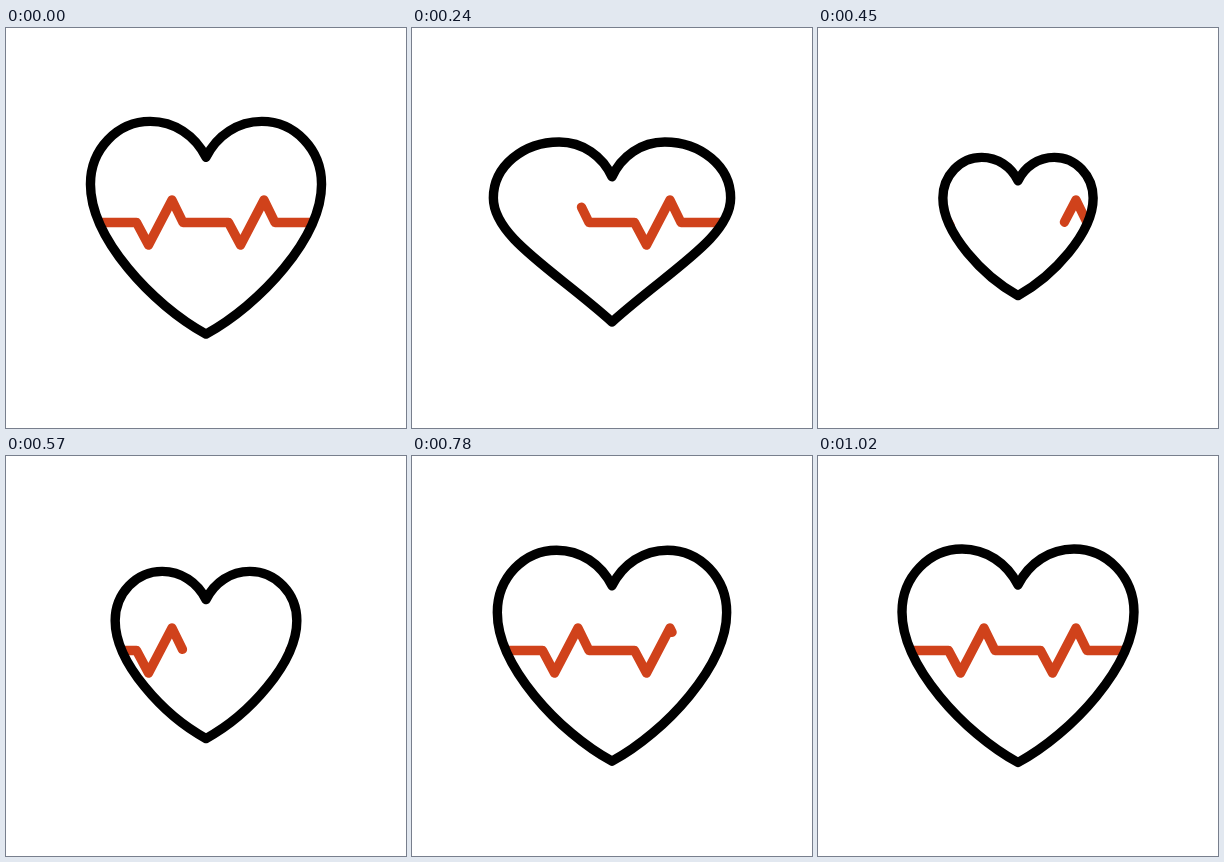
An HTML page for the animation above (1.29 s loop, 400 px wide and 400 px high).

```html
<!DOCTYPE html>
<html lang="en">
<head>
<meta charset="utf-8">
<title>Heartbeat</title>
<style>
  /* Each shape is the stage frame plus a heart, so the even-odd fill masks everything outside the heart. */
  :root {
    --rest: path("M-20 -20H420V420H-20Z M200 129C189 107 168 93 144 93C111 93 84 121 84 156C84 210 146 277 200 306.5C254 277 316 210 316 156C316 121 289 93 256 93C232 93 211 107 200 129Z");
    --small: path("M-20 -20H420V420H-20Z M200 152.7C192.9 138.4 179.3 129.4 163.8 129.4C142.4 129.4 124.9 147.5 124.9 170.1C124.9 205.1 165.1 248.4 200 267.5C234.9 248.4 275.1 205.1 275.1 170.1C275.1 147.5 257.6 129.4 236.2 129.4C220.7 129.4 207.1 138.4 200 152.7Z");
    --wide: path("M-20 -20H420V420H-20Z M200 148C190 126 169 111 144 111C106 111 73 136 73 170C73 210 138 241 200 299C262 241 327 210 327 170C327 136 294 111 256 111C231 111 210 126 200 148Z");
  }
  html, body { margin: 0; width: 100%; height: 100%; overflow: hidden; background: #fff; }
  svg { display: block; width: 100%; height: 100%; stroke-width: 9.4; stroke-linecap: round; stroke-linejoin: round; }

  .heart {
    d: var(--rest);
    fill: #fff;
    fill-rule: evenodd;
    stroke: #000;
    animation: beat 1290ms linear infinite;
  }
  .pulse { fill: none; stroke: #d0421b; stroke-dasharray: 1 2; }
  .leave { animation: leave 1290ms linear infinite; }
  .enter { animation: enter 1290ms linear infinite; }

  @keyframes beat {
    0% { d: var(--rest); }
    6.977% { d: var(--small); }
    20.93% { d: var(--wide); }
    27.907% { d: var(--rest); }
    34.884% { d: var(--small); animation-timing-function: cubic-bezier(.33, .1, .3, 1); }
    67.442%, 100% { d: var(--rest); }
  }
  @keyframes leave {
    0% { stroke-dashoffset: 0; }
    48.837% { stroke-dashoffset: -1; }
    48.838%, 100% { stroke-dashoffset: -1.2; }
  }
  @keyframes enter {
    0%, 30.619% { stroke-dashoffset: 1.2; }
    30.62% { stroke-dashoffset: 1; animation-timing-function: cubic-bezier(.333, .56, .667, .95); }
    79.07%, 100% { stroke-dashoffset: 0; }
  }
</style>
</head>
<body>
<svg viewBox="0 0 400 400">
  <defs>
    <path id="trace" pathLength="1" d="M84 194.5H130.5L142.5 217L166 172L177 194.5H222.5L234.5 217L258 172L269 194.5H316"/>
  </defs>
  <use href="#trace" class="pulse leave"/>
  <use href="#trace" class="pulse enter"/>
  <path class="heart"/>
</svg>
</body>
</html>
```
